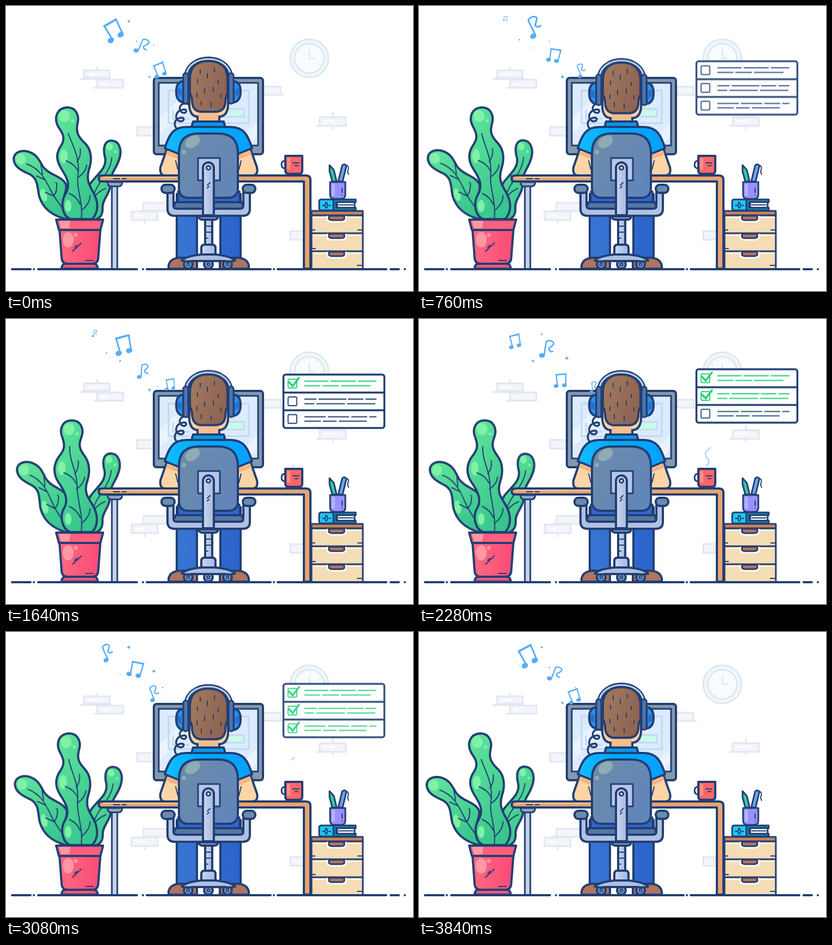
Recreate the animation shown at these times as an HTML page without scripts. Size 746 by 523 pixels, loop 3880 ms.

```html
<!DOCTYPE html>
<html lang="en">
<head>
<meta charset="utf-8">
<title>Working at a desk</title>
<style>
html, body { margin: 0; width: 100%; height: 100%; overflow: hidden; background: #fff; }
svg { display: block; width: 746px; height: 523px; }
:root { --loop: 3880ms; --sine: cubic-bezier(.37, 0, .63, 1); }

.ink { stroke: #223f73; stroke-width: 4; stroke-linejoin: round; stroke-linecap: round; }
.thin { stroke-width: 2; fill: none; }
.mid { stroke-width: 3; }
.none { fill: none; }
.brick { fill: #f3f5fb; stroke: #e1e7f1; stroke-width: 3; stroke-linecap: round; stroke-linejoin: round; }

/* Plant */
.leaf-left { transform-origin: 105px 390px; animation: lean 1940ms var(--sine) infinite alternate; }
.leaf-right { transform-origin: 165px 392px; animation: sway 1940ms var(--sine) -970ms infinite alternate; }
.stem { animation: bend 1940ms var(--sine) infinite alternate; }
.vein { animation: vein 1940ms var(--sine) infinite alternate; }
.tip { animation: tip 1940ms var(--sine) infinite alternate; }
.belly { animation: belly 1940ms var(--sine) infinite alternate; }
@keyframes lean { to { transform: rotate(3.3deg); } }
@keyframes sway { from { transform: rotate(1.2deg); } to { transform: rotate(-1.2deg); } }
@keyframes tip { to { transform: translate(9px, 0); } }
@keyframes belly { to { transform: translate(-4px, -2px); } }
@keyframes bend {
  from { d: path("M118 391C102 385 100 360 109 345C119 328 112 315 101 298C90 280 93 268 101 256C110 242 103 232 96 222C86 203 95 187 112 186C129 186 135 202 131 216C128 232 132 240 145 252C157 264 158 283 152 300C147 318 152 328 160 342C170 360 170 378 158 391Z"); }
  to { d: path("M118 391C102 385 98 362 106 348C116 332 106 314 96 300C84 282 88 264 97 252C107 240 109 232 104 218C97 202 104 186 121 186C138 186 144 202 139 216C132 232 136 240 143 250C154 264 154 280 149 297C142 316 149 326 158 340C169 358 170 378 158 391Z"); }
}
@keyframes vein {
  from { d: path("M114 234C124 260 136 280 132 310C128 335 142 360 138 391"); }
  to { d: path("M117 234C115 262 130 278 130 305C130 330 142 360 138 391"); }
}

.head { animation: nod 970ms var(--sine) infinite alternate; }
@keyframes nod { to { transform: translateY(3px); } }

/* Music */
.note { fill: none; stroke: #58acf8; stroke-width: 2.4; stroke-linecap: round; stroke-linejoin: round;
  animation: drift var(--loop) linear infinite, grow var(--loop) linear infinite, var(--turn) var(--loop) linear infinite;
  animation-delay: var(--at); }
.pair { --turn: rock; }
.single { --turn: curl; }
@keyframes drift {
  0% { translate: 320px 138px; } 4.4% { translate: 318px 125px; } 13% { translate: 300px 120px; }
  20.6% { translate: 281px 118px; } 24.2% { translate: 270px 114px; } 29.4% { translate: 259px 113px; }
  39.5% { translate: 247px 93px; } 45.6% { translate: 247px 73px; } 49.2% { translate: 238px 71px; }
  54.4% { translate: 232px 55px; } 63% { translate: 214px 48px; } 65.2% { translate: 208px 40px; }
  70.6% { translate: 196px 46px; } 74.2% { translate: 184px 39px; } 79.4% { translate: 175px 41px; }
  90% { translate: 158px 23px; } 100% { translate: 156px 20px; }
}
@keyframes grow {
  0% { scale: 0; } 4.4% { scale: .65; } 13% { scale: .75; } 20.6%, 40% { scale: .93; }
  49% { scale: 1.05; } 63% { scale: 1.25; } 70.6% { scale: 1.3; } 74.2% { scale: 1.05; }
  79.4% { scale: .9; } 90% { scale: .33; } 93%, 100% { scale: 0; }
}
@keyframes rock {
  0% { rotate: 0deg; } 13% { rotate: -10deg; } 20.6% { rotate: -22deg; } 29.4% { rotate: -5deg; }
  40% { rotate: 9deg; } 49% { rotate: 13deg; } 63% { rotate: -15deg; } 70.6% { rotate: -30deg; }
  79.4% { rotate: -14deg; } 90%, 100% { rotate: 0deg; }
}
@keyframes curl {
  0% { rotate: 0deg; } 4.4% { rotate: -10deg; } 15.2%, 24.2% { rotate: -28deg; } 38% { rotate: 0deg; }
  45.6% { rotate: 20deg; } 54.4% { rotate: 5deg; } 65.2%, 74.2% { rotate: -30deg; } 88%, 100% { rotate: 0deg; }
}
.sparks use { fill: #58acf8; animation: twinkle 485ms var(--sine) var(--at) infinite alternate; }
@keyframes twinkle { from { scale: 0; } }

/* To-do board */
@property --done { syntax: "<number>"; inherits: true; initial-value: 0; }
.fade { animation: fade var(--loop) linear infinite; }
@keyframes fade { 0%, 9% { opacity: 0; } 21%, 78% { opacity: 1; } 91%, 100% { opacity: 0; } }
.float { animation: float 970ms linear infinite; }
@keyframes float {
  0%, 100% { transform: translateY(-.9px); } 11.3% { transform: translateY(-3px); } 17.5% { transform: translateY(-5.8px); }
  25% { transform: translateY(-8.4px); } 32% { transform: translateY(-9.3px); } 40% { transform: translateY(-8px); }
  50% { transform: translateY(-4.8px); } 60% { transform: translateY(-1.2px); } 69% { transform: translateY(1px); }
  78% { transform: translateY(.4px); }
}
.row { --done: 0; animation: var(--check) var(--loop) linear infinite; }
.first { --check: check-first; }
.second { --check: check-second; }
.third { --check: check-third; }
@keyframes check-first { 0%, 26% { --done: 0; } 34%, 92% { --done: 1; } 92.1%, 100% { --done: 0; } }
@keyframes check-second { 0%, 43% { --done: 0; } 51%, 92% { --done: 1; } 92.1%, 100% { --done: 0; } }
@keyframes check-third { 0%, 57.500% { --done: 0; } 65.500%, 92% { --done: 1; } 92.1%, 100% { --done: 0; } }
.item { fill: none; stroke: color-mix(in srgb, #21cf74 calc(var(--done) * 100%), #223f73); stroke-width: 1.8; }
.tick { fill: none; stroke: #21cf74; stroke-width: 3.6; stroke-linecap: round; stroke-linejoin: round;
  stroke-dasharray: 1 2; stroke-dashoffset: calc(min(1.2, 1.7 - 1.7 * var(--done))); }

.steam { fill: none; stroke: #a9c4ee; stroke-width: 2; stroke-dasharray: 1 2; stroke-dashoffset: 1;
  animation: steam var(--loop) linear infinite; }
@keyframes steam {
  0%, 41% { stroke-dashoffset: 1; transform: none; } 57% { stroke-dashoffset: 0; transform: none; }
  61% { stroke-dashoffset: 0; transform: translate(-1px, -1px); }
  84%, 100% { stroke-dashoffset: -1; transform: translate(-7px, -8px); }
}
</style>
</head>
<body>
<svg viewBox="0 0 746 523">
  <defs>
    <linearGradient id="green" x2=".6" y2="1"><stop stop-color="#62e69c"/><stop offset="1" stop-color="#38c58e"/></linearGradient>
    <linearGradient id="shirt"><stop stop-color="#14bcff"/><stop offset=".4" stop-color="#00aaff"/><stop offset="1" stop-color="#06a0ff"/></linearGradient>
    <linearGradient id="hair" x2="1" y2=".4"><stop stop-color="#a47b60"/><stop offset="1" stop-color="#8f6453"/></linearGradient>
    <linearGradient id="back" x2="1" y2=".7"><stop stop-color="#6c8ca8"/><stop offset="1" stop-color="#6285ba"/></linearGradient>
    <linearGradient id="steel"><stop stop-color="#cad7f0"/><stop offset="1" stop-color="#a5b8df"/></linearGradient>
    <linearGradient id="pot"><stop stop-color="#ff6a80"/><stop offset="1" stop-color="#fb4a78"/></linearGradient>
    <linearGradient id="denim"><stop stop-color="#3976d3"/><stop offset="1" stop-color="#2c62cb"/></linearGradient>
    <g id="pair">
      <g fill="#58acf8"><ellipse cx="-9" cy="10" rx="3.500" ry="2.500"/><ellipse cx="7" cy="10" rx="3.500" ry="2.500"/></g>
      <path d="M-6.500 10-7-12M12-12 10 10"/><path d="M-7-12H12" stroke-width="3"/>
    </g>
    <g id="single">
      <ellipse cx="-5" cy="11" rx="3.500" ry="2.500" fill="#58acf8"/>
      <path d="M-1.500 11 0-12C6-17 16-12 11-7L5-1Q7 5 12 3"/>
    </g>
    <path id="spark" d="M0-4 1.300-1.300 4 0 1.300 1.300 0 4-1.300 1.300-4 0-1.300-1.300Z"/>
    <circle id="dot" r="1.300"/>
    <g id="wheel"><circle r="8" fill="#7f9ccc" class="ink"/><circle r="2.500" fill="#dce6f7" class="ink thin"/></g>
    <g id="handle">
      <path d="M589 386V393Q591 396 597 396H615Q621 396 623 393V386" fill="none" stroke="#fff" stroke-width="2.500"/>
      <path fill="#b8735b" class="ink mid" d="M592 385H620V391Q618 393 615 393H597Q594 393 592 391Z"/>
    </g>
  </defs>

  <!-- Wall -->
  <g class="brick">
    <path d="M143 118h47v14h-47zM167 135h48v15h-48zM470 148h33v15h-33zM240 222h32v16h-32zM575 204h48v16h-48zM252 361h48v15h-48zM230 377h48v16h-48zM521 413h28v16h-28z"/>
    <path d="M167 112v6M136 134h30M190 132v3M161 150h6M503 163h5M599 195v9M570 220h5M599 220v5M246 376h8M254 393v6"/>
    <path stroke="#fff" d="M152 125h10M166 125h3M176 143h10M584 211h18M240 385h10"/>
  </g>
  <g fill="#eef8fe" stroke="#dfe7ef" stroke-width="3">
    <circle cx="556" cy="96" r="35"/>
    <circle cx="556" cy="96" r="27" fill="#f8fcff"/>
    <circle cx="556" cy="96" r="22" fill="none" stroke-width="2.500" stroke-dasharray="1.500 10.020"/>
    <path d="M556 81v15h10" fill="none" stroke-width="2.500"/>
  </g>

  <!-- Monitor -->
  <rect x="271" y="132" width="200" height="140" rx="5" fill="#8499ad" class="ink"/>
  <rect x="280" y="141" width="182" height="115" fill="#dcebff" class="ink mid"/>
  <path d="M282 205 346 143H378L282 236zM420 254 460 214V240L446 254z" fill="#e9f4ff"/>
  <g fill="none" stroke="#c4d8f2" stroke-width="3"><path d="M298 155H445V215H298z"/><path d="M385 189h51v14h-51z" fill="#c9fbe9"/><path d="M306 190v17h30"/></g>

  <!-- Plant -->
  <g class="leaf-left">
    <path fill="url(#green)" class="ink" d="M106 390C85 384 68 372 61 350C57 335 60 318 44 309C28 302 14 295 14 280C15 268 28 264 40 267C58 272 62 286 68 295C78 310 104 312 110 328C113 345 98 350 112 368L125 392Z"/>
    <ellipse cx="27" cy="281" rx="9" ry="10" fill="#7ff2a6"/><ellipse cx="69" cy="347" rx="6" ry="12" fill="#7ff2a6" transform="rotate(-15 69 347)"/>
    <path class="ink thin" d="M38 290C62 298 72 318 82 338S100 364 108 378M64 291 67 309M56 312 72 319M93 325Q94 340 88 348M72 342 88 349M91 324v.1"/>
  </g>
  <g class="leaf-right">
    <path fill="url(#green)" class="ink" d="M160 392C140 370 145 340 156 324C168 308 184 298 182 280C176 258 182 247 193 247C207 247 212 262 209 276C205 296 192 304 192 322C192 345 176 355 177 370C178 385 170 392 160 392Z"/>
    <ellipse cx="190" cy="258" rx="6" ry="7" fill="#7ff2a6"/><circle cx="201" cy="268" r="2.500" fill="#7ff2a6"/>
    <path class="ink thin" d="M194 278C192 306 166 324 160 350S154 370 152 380M170 309 172 326M182 335Q170 340 162 350M155 335 160 348"/>
  </g>
  <path class="stem ink" fill="url(#green)"/>
  <g class="tip" fill="#7ff2a6"><ellipse cx="107" cy="202" rx="10" ry="11"/><circle cx="122" cy="211" r="3"/></g>
  <g class="belly">
    <ellipse cx="106" cy="276" rx="7" ry="13" fill="#7ff2a6"/>
    <path class="ink thin" d="M136 262Q138 275 130 286M110 284Q126 290 132 303M148 292Q146 305 133 314"/>
  </g>
  <ellipse cx="114" cy="367" rx="6" ry="11" fill="#7ff2a6"/>
  <path class="ink thin" d="M116 344Q130 350 136 364M154 348Q154 362 140 374"/>
  <path class="vein ink thin"/>
  <g class="ink">
    <path fill="url(#pot)" d="M98 410H173L169 463Q168 473 158 473H113Q103 473 102 463Z"/>
    <path fill="#ff5f7e" d="M92 392H178L173 411H97Z"/>
    <path fill="#fb5578" d="M108 473H162Q168 474 168 482H102Q102 474 108 473Z"/>
    <path class="thin" d="M122 450 138 435M126 443 130 439M146 467H160"/>
  </g>
  <g fill="#ff98a2"><ellipse cx="114" cy="429" rx="10" ry="14"/><circle cx="128" cy="420" r="3.500"/><path d="M97 394H118L116 408H101z"/></g>

  <!-- Legs and shoes -->
  <g class="ink">
    <path fill="#b0745f" d="M298 482V476Q301 463 318 462H350V482ZM445 482V476Q442 463 425 462H392V482Z"/>
    <path fill="url(#denim)" d="M313 345H350V462H313ZM393 345H430V462H393Z"/>
  </g>
  <path d="M315 340H428V372H315Z" fill="#2f66cf" class="ink mid"/>

  <!-- Arms and shirt -->
  <g class="ink">
    <path fill="#fcd4a6" d="M295 262 283 296Q281 311 292 311H322V262ZM448 262 460 296Q463 311 451 311H420V262Z"/>
    <path fill="url(#shirt)" d="M291 261C298 238 306 222 330 222H412C436 222 444 238 451 261L424 272V311H318V272Z"/>
    <path class="thin" d="M311 284 315 300M431 284 427 300"/>
  </g>
  <path d="M295 266 316 274 315 281 293 272zM448 266 427 274 428 281 450 272z" fill="#f2b384"/>

  <!-- Desk -->
  <path fill="#c4d2e8" class="ink mid" d="M194 330H204V483H194Z"/>
  <path fill="#8fa8cc" class="ink mid" d="M186 323H213Q213 331 206 331H193Q186 331 186 323Z"/>
  <path fill="#e6a470" class="ink" d="M176 311H550Q558 311 558 319V482H546V322H176Q170 322 170 316.500Q170 311 176 311Z"/>
  <path d="M178 314H316" stroke="#ffd0a2" stroke-width="2"/>
  <path class="ink thin" d="M197 317H208M213 317H220"/>

  <!-- Neck, cord and head -->
  <path class="ink none" style="stroke-width:3.500" d="M334 180C320 176 314 188 322 195C332 200 333 188 325 190C311 192 308 206 317 211C328 214 328 203 320 205C309 207 307 217 312 224"/>
  <path fill="#f6bd90" class="ink" d="M351 190H391V214H351Z"/>
  <path fill="#0a97ea" class="ink" d="M340 222 343 212H399L402 222Z"/>
  <g class="head">
    <path fill="#fcd2a6" class="ink" d="M336 155V184Q338 203 352 203H390Q405 203 407 184V155Z"/>
    <path fill="#f6bd90" d="M353 196H389V207H353Z"/>
    <path fill="url(#hair)" class="ink" d="M337 134Q337 101 371 101Q406 101 406 134V160Q402 166 402 178Q400 194 384 194H358Q343 194 341 176Q341 166 337 160Z"/>
    <path class="ink thin" d="M356 117v7M382 114v7M369 124v8M351 135v6M389 137v6M364 152v8M380 149v8M350 160v7M394 162v6M358 175v7M376 177v8"/>
    <path class="ink none" style="stroke-width:9" d="M330 134C330 85 412 85 412 134"/>
    <path fill="none" stroke="#c3d3ef" stroke-width="3" d="M330 131C331 86 411 86 412 131"/>
    <g class="ink">
      <path fill="#1e93f6" d="M325 138Q312 139 312 157Q312 175 325 177ZM417 138Q430 139 430 157Q430 175 417 177Z"/>
      <path fill="#4f75ad" class="mid" d="M325 126Q329 120 334 126V177Q329 182 325 177ZM408 126Q413 120 417 126V177Q413 182 408 177Z"/>
    </g>
    <path fill="#2a6ec7" d="M314 148 322 154V166L314 163zM428 148 420 154V166L428 163z"/>
  </g>

  <!-- Chair -->
  <g class="ink">
    <path fill="#5577a5" d="M311 360H432L437 373H305Z"/>
    <path fill="url(#back)" d="M317 270Q317 234 353 234H389Q425 234 425 270V334Q425 352 407 352H335Q317 352 317 334Z"/>
    <path fill="#b0c1e3" d="M296 342H307V366Q307 372 313 372H429Q435 372 435 366V342H447V372Q447 385 434 385H309Q296 385 296 372Z"/>
    <rect x="285" y="328" width="24" height="15" rx="7" fill="#6c8bad"/>
    <rect x="434" y="328" width="23" height="15" rx="7" fill="#6c8bad"/>
    <path fill="#8ba4d0" d="M353 386H389Q388 392 382 392H360Q354 392 353 386Z"/>
    <path fill="url(#steel)" d="M365 392H378V440H365Z"/>
    <path class="thin" d="M367 404H376M367 415H376M367 426H370"/>
    <path fill="url(#steel)" d="M358 456V444Q358 438 364 438H378Q384 438 384 444V456Z"/>
  </g>
  <ellipse cx="342" cy="249" rx="15" ry="10" transform="rotate(-35 342 249)" fill="#8fabb4"/>
  <circle cx="326" cy="268" r="4" fill="#8fabb4"/>
  <use href="#wheel" x="334" y="474"/><use href="#wheel" x="371" y="474"/><use href="#wheel" x="406" y="474"/>
  <path fill="#aebfe2" class="ink" d="M322 467Q330 459 358 456H384Q412 459 420 467Q412 470 400 468H342Q330 470 322 467Z"/>
  <g class="ink">
    <path fill="#b7c6e7" class="mid" d="M352 279H392V320H352Z"/>
    <path fill="url(#steel)" d="M361 297A10 10 0 0 1 381 297V384H361Z"/>
    <circle cx="371" cy="297" r="3.500" fill="#fff" class="mid"/>
    <path class="thin" d="M369 329 374 324M369 334 372 331"/>
  </g>

  <!-- Mug -->
  <path class="steam" pathLength="1" d="M526 270C535 266 532 259 527 253C522 246 528 242 535 236"/>
  <g class="ink">
    <path class="mid none" d="M512 284Q505 284 505 291T512 298"/>
    <path fill="#fb6669" d="M512 275H543V302Q543 308 537 308H518Q512 308 512 302Z"/>
    <path class="thin" d="M526 288H537M530 293H535"/>
  </g>
  <path d="M515 279h6v21h-6z" fill="#ff8d88"/>

  <!-- Cabinet, books and pens -->
  <g class="ink mid">
    <path fill="#f4dcb5" d="M560 384H654V483H560Z"/>
    <path stroke="#fff" stroke-width="2" d="M563 388H651M563 421H651M563 454H651" style="stroke:#fff"/>
    <path d="M560 417H654M560 450H654"/>
    <path fill="#cb8259" d="M560 376H654V384H560Z"/>
    <use href="#handle"/><use href="#handle" y="33"/><use href="#handle" y="66"/>
    <path class="thin" d="M562 411H566M645 411H652M562 445H567M644 476H652"/>
    <path fill="#1792b8" d="M600 355H641V360H605V370H641V375H600Z"/>
    <path fill="#fff" d="M607 360H639V370H607Z"/>
    <path class="thin" d="M610 365H636"/>
    <path fill="#1cc9f6" d="M578 355H600V375H578Q574 375 574 371V359Q574 355 578 355Z"/>
    <path class="thin" d="M580 366h3M592 366h3M587 360q5 6 0 11q-5-5 0-11"/>
    <path fill="#35c9a2" d="M593 292 601 301 606 322H598L593 303Z"/>
    <path fill="#6ea5ee" d="M609 322 616 293Q620 288 624 293L617 322Z"/>
    <path class="thin" d="M624 293Q630 293 626 304L628 309"/>
    <path fill="#9990fc" d="M594 323H622V346Q622 354 614 354H602Q594 354 594 346Z"/>
    <path class="thin" d="M616 334V342M616 347v.1"/>
  </g>
  <path d="M597 326h6v22h-6z" fill="#b7b0ff"/>

  <path class="ink none" d="M11 483H45M51 483h.1M59 483H240M251 483h.1M258 483H485M491 483h.1M498 483H697M705 483H720M731 483h.1"/>

  <!-- To-do board -->
  <g class="fade"><g class="float">
    <rect x="508.500" y="101" width="185" height="98" rx="4" fill="#fff" class="ink" style="stroke-width:3.500"/>
    <path class="ink" style="stroke-width:3.500" d="M509 134H693M509 166.500H693"/>
    <g class="row first">
      <path class="item" d="M519 109.500h12q2 0 2 2v12q0 2-2 2h-12q-2 0-2-2v-12q0-2 2-2M547 113h44m4 0h46m4 0h34M547 121.500h29m4 0h30m4 0h54"/>
      <path class="tick" pathLength="1" d="M519 115 525.500 122 537 107"/>
    </g>
    <g class="row second">
      <path class="item" d="M519 142h12q2 0 2 2v12q0 2-2 2h-12q-2 0-2-2v-12q0-2 2-2M547 146h22m4 0h51m3 0h28m4 0h20M547 154.500h18m4 0h52m4 0h52"/>
      <path class="tick" pathLength="1" d="M519 147.500 525.500 154.500 537 139.500"/>
    </g>
    <g class="row third">
      <path class="item" d="M519 174.500h12q2 0 2 2v12q0 2-2 2h-12q-2 0-2-2v-12q0-2 2-2M547 178.500h39m4 0h39m4 0h29m4 0h13M547 186.500h30m4 0h25m4 0h51"/>
      <path class="tick" pathLength="1" d="M519 180 525.500 187 537 172"/>
    </g>
  </g></g>

  <!-- Music -->
  <g class="sparks">
    <g transform="translate(225 28)"><use href="#spark" style="--at:-1315ms"/></g>
    <g transform="translate(271 72)"><use href="#spark" style="--at:-1175ms"/></g>
    <g transform="translate(209 77)"><use href="#spark" style="--at:-975ms"/></g>
    <g transform="translate(263 130)"><use href="#spark" style="--at:-665ms"/></g>
    <g transform="translate(287 102)"><use href="#dot" style="--at:-1355ms"/></g>
    <g transform="translate(239 65)"><use href="#dot" style="--at:-575ms"/></g>
    <g transform="translate(278 124)"><use href="#dot" style="--at:-905ms"/></g>
    <g transform="translate(184 62)"><use href="#dot" style="--at:-715ms"/></g>
  </g>
  <g class="note pair" style="--at:-2740ms"><use href="#pair"/></g>
  <g class="note pair" style="--at:-800ms"><use href="#pair"/></g>
  <g class="note single" style="--at:-3710ms"><use href="#single"/></g>
  <g class="note single" style="--at:-1770ms"><use href="#single"/></g>
</svg>
</body>
</html>
```
